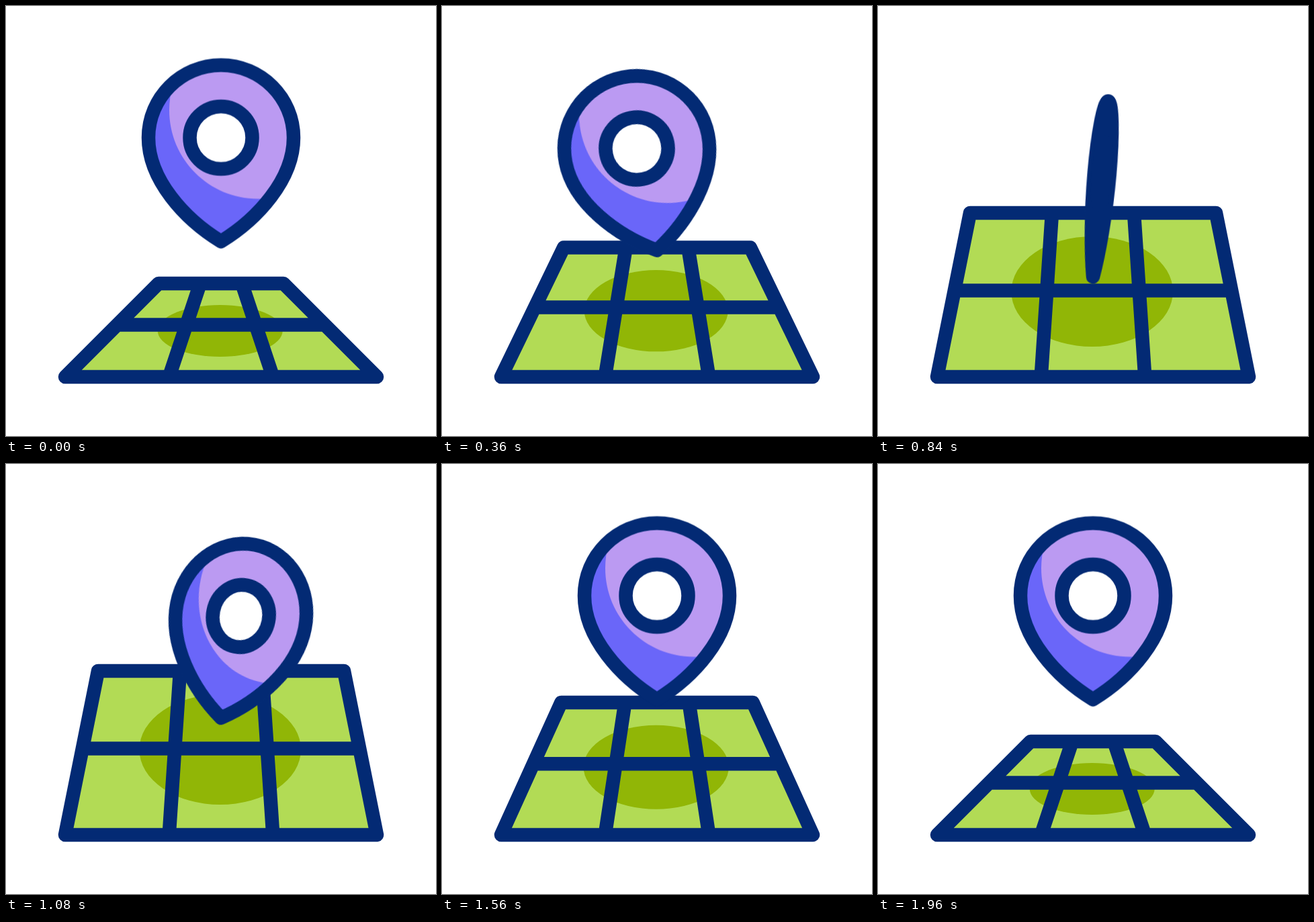
An HTML page that plays this animation: 640x640 px, repeating every 2 s.

```html
<!DOCTYPE html>
<html lang="en">
<head>
<meta charset="utf-8">
<title>Map pin</title>
<style>
  :root {
    --navy: #032a74;
    --smooth: cubic-bezier(.333, 0, .667, 1);
  }
  html, body {
    margin: 0;
    width: 100%;
    height: 100%;
    overflow: hidden;
    background: #fff;
  }
  svg { display: block; width: 100%; height: 100%; }

  .line {
    fill: none;
    stroke: var(--navy);
    stroke-width: 20.5;
    stroke-linecap: round;
    stroke-linejoin: round;
  }
  .grass { fill: #b2db55; }
  .shadow { fill: #91b606; }
  .light { fill: #bb9af2; }
  .shade { fill: #6a66f9; }
  .ring { fill: #fff; }

  .map, .shadow, .fall, .lean, .body, .shade, .ring {
    animation: 2s var(--smooth) infinite;
  }
  .map { animation-name: tilt; }
  .shadow { animation-name: spread; }
  .fall { animation-name: fall; }
  .lean { animation-name: lean; }
  .body { animation-name: turn-body; }
  .shade { animation-name: turn-shade; }
  .ring { animation-name: turn-ring; }

  /* Map: rises towards the viewer, then lies down again */
  @keyframes tilt {
    0%, 4%, 98%, 100% {
      d: path("M88 552 L227 413 L413 413 L552 552 Z M165.5 474.5 L474.5 474.5 M242.7 552 L289 413 M397.3 552 L351 413");
      animation-timing-function: ease-in-out;
    }
    31.8%, 60% {
      d: path("M88 552 L137 308 L503 308 L552 552 Z M113.8 423.5 L526.2 423.5 M242.7 552 L259 308 M397.3 552 L381 308");
      animation-timing-function: cubic-bezier(.52, 0, .48, 1);
    }
  }
  @keyframes spread {
    0%, 4%, 98%, 100% {
      cy: 483.5px; rx: 93px; ry: 38.5px;
      animation-timing-function: ease-in-out;
    }
    31.8%, 60% {
      cy: 425px; rx: 120.3px; ry: 82px;
      animation-timing-function: cubic-bezier(.52, 0, .48, 1);
    }
  }

  /* Pin: drops and sways about its tip */
  @keyframes fall {
    0%, 9%, 70%, 100% { transform: translateY(0); }
    37.5%, 38% { transform: translateY(55px); }
  }
  @keyframes lean {
    0%, 6%, 68%, 100% { transform: rotate(0deg); }
    28% { transform: rotate(-19.6deg); }
    49% { transform: rotate(13.4deg); }
  }

  /* Pin: narrows to its edge while the line weight stays the same */
  @keyframes turn-body {
    0%, 18%, 58%, 100% {
      d: path("M0 0 C-54 -33 -108 -92 -108 -154.5 C-108 -214.1 -59.6 -262.5 0 -262.5 C59.6 -262.5 108 -214.1 108 -154.5 C108 -92 54 -33 0 0 Z");
    }
    38% {
      d: path("M0 0 C0 -33 0 -92 0 -154.5 C0 -214.1 0 -262.5 0 -262.5 C0 -262.5 0 -214.1 0 -154.5 C0 -92 0 -33 0 0 Z");
    }
  }
  @keyframes turn-shade {
    0%, 18%, 58%, 100% { transform: scaleX(1); }
    38% { transform: scaleX(0); }
  }
  @keyframes turn-ring {
    0%, 18%, 58%, 100% { rx: 46.5px; }
    38% { rx: .1px; }
  }
</style>
</head>
<body>
<svg viewBox="0 0 640 640">
  <path class="map grass"/>
  <ellipse class="shadow" cx="318.7" cy="483.5" rx="93" ry="38.5"/>
  <path class="map line"/>

  <g transform="translate(320 350.5)">
    <g class="fall">
      <g class="lean">
        <path class="body light"/>
        <path class="shade" d="M0 0 C-54 -33 -108 -92 -108 -154.5 C-108 -182 -98 -209 -76 -230 L-72.3 -230.5 C-75.4 -219.1 -77 -207.3 -77 -195.5 C-77 -122.6 -17.9 -63.5 55 -63.5 C61 -63.5 67 -64 72 -64.6 C54 -39.5 27 -16.5 0 0 Z"/>
        <path class="body line"/>
        <ellipse class="line ring" cy="-154.5" rx="46.5" ry="46.5" style="fill:#fff"/>
      </g>
    </g>
  </g>
</svg>
</body>
</html>
```
